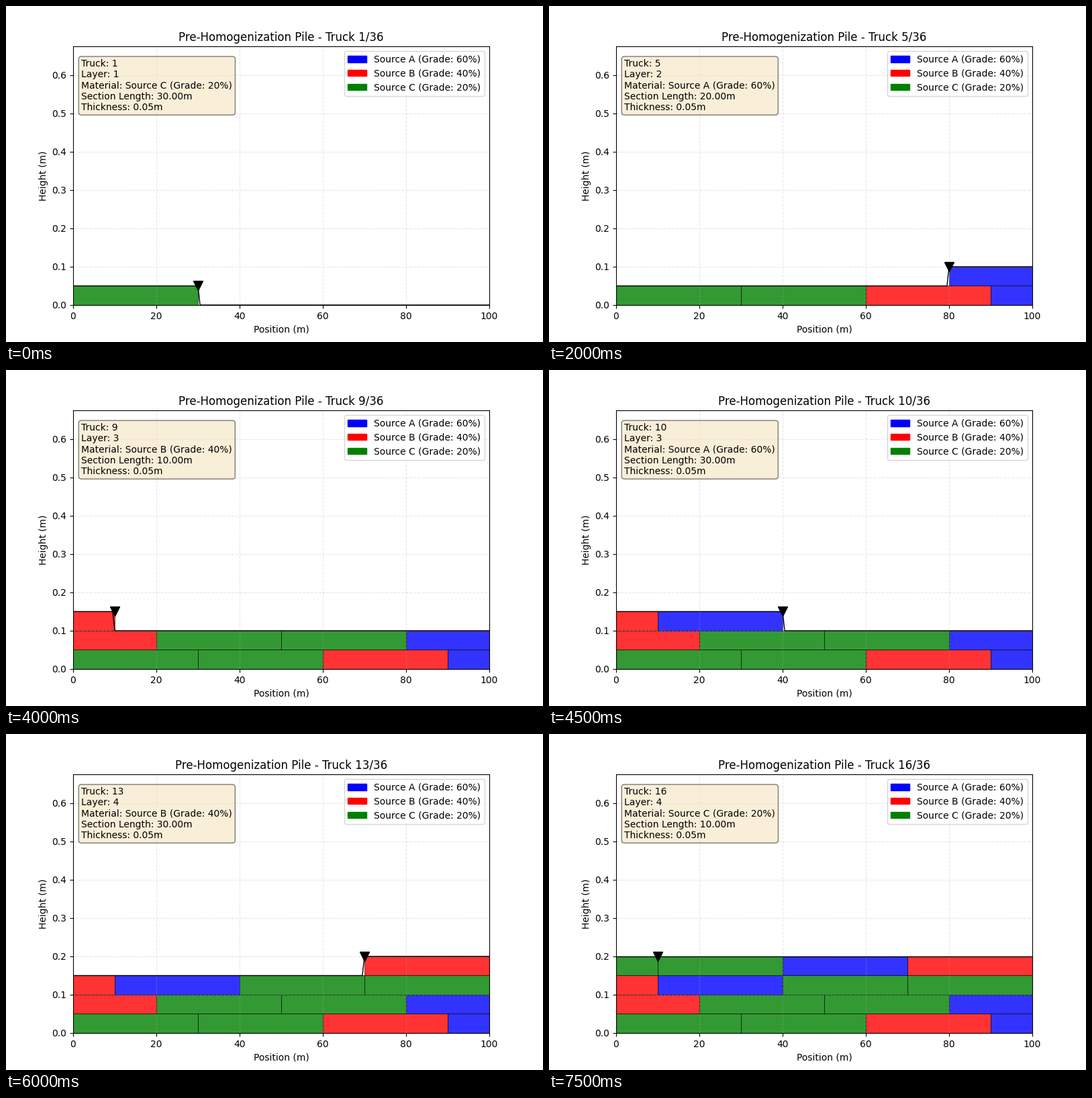
Animation of 800 by 500 pixels, one loop 8 s. Source, as a matplotlib script:

```python
import matplotlib.pyplot as plt
import numpy as np
from matplotlib.animation import FuncAnimation
from matplotlib.patches import Patch, Rectangle

LENGTH, LOAD, THICK = 100, 30, 0.05
LAYERS, SHOWN = 9, 16
CYCLE = "CCBA"
SOURCES = {"A": ("blue", 60), "B": ("red", 40), "C": ("green", 20)}


def label(key):
    return f"Source {key} (Grade: {SOURCES[key][1]}%)"


def build_sections():
    """Split the travelled distance at every load and layer boundary."""
    total = LENGTH * LAYERS
    cuts = sorted(set(range(0, total + 1, LOAD)) | set(range(0, total + 1, LENGTH)))
    sections = []
    for a, b in zip(cuts, cuts[1:]):
        layer = a // LENGTH
        lo, hi = a - layer * LENGTH, b - layer * LENGTH
        right = layer % 2 == 0
        if not right:
            lo, hi = LENGTH - hi, LENGTH - lo
        # the stacker has already turned round when a layer is complete
        heading_right = right != (b % LENGTH == 0)
        sections.append(dict(
            layer=layer, lo=lo, hi=hi, key=CYCLE[a // LOAD % len(CYCLE)],
            top=(layer + 1) * THICK, head=hi if heading_right else lo,
            # a carried-over remainder falls just short of its end
            short=1e-9 if right and lo == 0 and a % LOAD else 0))
    return sections


sections = build_sections()
trucks = 4 * LAYERS
x = np.linspace(0, LENGTH, 201)

fig, ax = plt.subplots(figsize=(8, 5), dpi=100)
ax.set_xlim(0, LENGTH)
ax.set_ylim(0, LAYERS * THICK * 1.5)
ax.set_xlabel("Position (m)")
ax.set_ylabel("Height (m)")
ax.grid(True, linestyle="--", alpha=0.3)
ax.legend(handles=[Patch(color=SOURCES[k][0], label=label(k)) for k in SOURCES],
          loc="upper right")

bars = [ax.add_patch(Rectangle((s["lo"], s["layer"] * THICK), s["hi"] - s["lo"], THICK,
                               facecolor=SOURCES[s["key"]][0], edgecolor="black",
                               linewidth=0.5, alpha=0.8))
        for s in sections[:SHOWN]]
surface, = ax.plot(x, 0 * x, "k-", linewidth=1)
head, = ax.plot([], [], "kv", markersize=10)
title = ax.set_title("")
info = ax.text(0.02, 0.95, "", transform=ax.transAxes, va="top",
               bbox=dict(boxstyle="round", facecolor="wheat", alpha=0.5))


def update(i):
    heights = np.zeros_like(x)
    for s in sections[:i + 1]:
        heights[(x >= s["lo"]) & (x <= s["hi"] - s["short"])] = s["top"]
    surface.set_ydata(heights)
    for n, bar in enumerate(bars):
        bar.set_visible(n <= i)
    s = sections[i]
    head.set_data([s["head"]], [s["top"]])
    title.set_text(f"Pre-Homogenization Pile - Truck {i + 1}/{trucks}")
    info.set_text(f"Truck: {i + 1}\n"
                  f"Layer: {s['layer'] + 1}\n"
                  f"Material: {label(s['key'])}\n"
                  f"Section Length: {s['hi'] - s['lo']:.2f}m\n"
                  f"Thickness: {THICK:.2f}m")
    return [*bars, surface, head, title, info]


anim = FuncAnimation(fig, update, frames=SHOWN, interval=500, repeat=True, repeat_delay=0)
plt.show()
```
